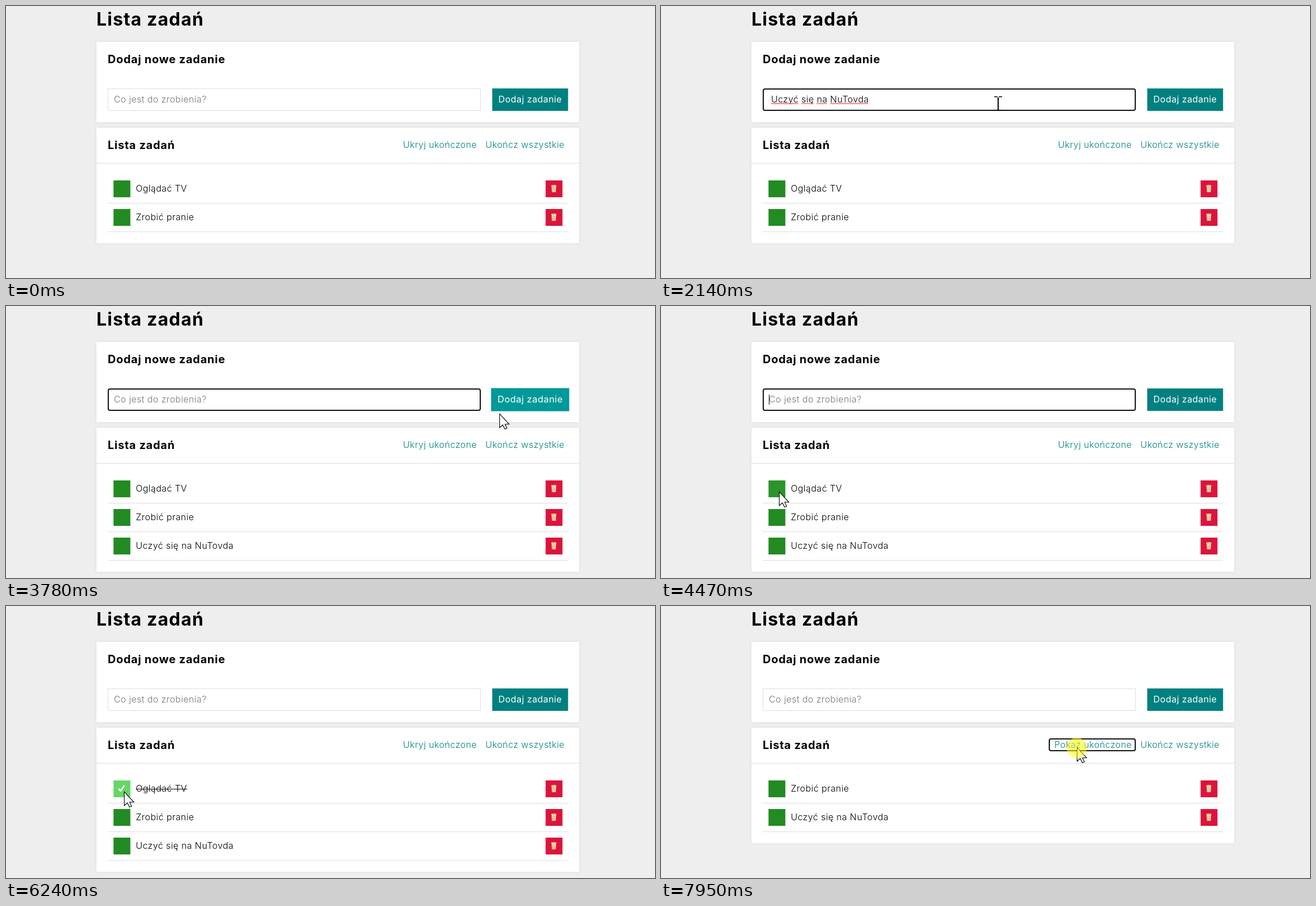
These frames come from a looping animation (1155 px wide and 485 px high, 8000 ms). An HTML page with a canvas:

```html
<!DOCTYPE html>
<html lang="pl">
<head>
<meta charset="utf-8">
<title>Lista zadań</title>
<style>
  html, body { margin: 0; width: 100%; height: 100%; overflow: hidden; background: #eee; }
  canvas { display: block; }
</style>
</head>
<body>
<canvas id="stage" width="1155" height="485"></canvas>
<script>
const ctx = document.getElementById('stage').getContext('2d');
const LOOP = 8000, TICK = 77.2, PHASE = 0.32, BLINK = 530;
const TEAL = '#008080', LINE = '#ddd';
const TASKS = ['Oglądać TV', 'Zrobić pranie', 'Uczyć się na NuTovda'];
const ROW = 51, NUDGE = 0.33; // animated boxes sit slightly off the pixel grid

// Mouse button down and up
const CLICK = {
  input: { down: 750, up: 840 },
  add: { down: 3150, up: 3230 },
  check: { down: 5390, up: 5470 },
  hide: { down: 7180, up: 7340 },
  show: { down: 7950, up: LOOP }
};
const APPEAR = 130, PASTE = 1150, SPELLCHECK = 1220;

// Each move bends towards `via` and slows down by the power `slow`
const HOME = [821, 390];
const MOVES = [
  { start: 130, end: 587, via: [365, 250], to: [337, 167], slow: 1.5 },
  { start: 1840, end: 2680, via: [652, 179], to: [968, 173], slow: 1.24 },
  { start: 2750, end: 2980, via: [965, 168], to: [961, 164], slow: 1 },
  { start: 3700, end: 4450, via: [600, 290], to: [210, 331], slow: 1.5 },
  { start: 6320, end: 7150, via: [670, 305], to: [740, 252], slow: 1.82 }
];

const pressed = (t, click) => t >= click.down && t < click.up;
const clamp = v => Math.max(0, Math.min(1, v));
const easeOut = (p, power) => 1 - Math.pow(1 - clamp(p), power);
const fade = (t, start, end, length) =>
  easeOut((t - start) / length, 2.3) * (1 - easeOut((t - end) / length, 2.3));
const mix = (a, b, p) => `rgb(${a.map((v, i) => Math.round(v + (b[i] - v) * p))})`;

function pointerAt(t) {
  let pos = HOME;
  for (const { start, end, via, to, slow } of MOVES) {
    if (t < start) break;
    const s = easeOut((t - start) / (end - start), slow), r = 1 - s;
    pos = pos.map((v, i) => r * r * v + 2 * r * s * via[i] + s * s * to[i]);
  }
  return pos.map(Math.round);
}

function rect(x, y, w, h, fill) {
  ctx.fillStyle = fill;
  ctx.fillRect(x, y, w, h);
}

function ring(x, y, w, h, r = 3) {
  ctx.strokeStyle = '#101010';
  ctx.lineWidth = 2;
  ctx.beginPath();
  ctx.roundRect(x, y, w, h, r);
  ctx.stroke();
}

function setFont(size, weight) {
  ctx.font = `${weight} ${size}px Inter, sans-serif`;
  ctx.letterSpacing = (weight > 600 ? size * 0.037 : 0.42) + 'px';
}

function text(str, x, y, { color = '#000', size = 16, weight = 300, align = 'left' } = {}) {
  setFont(size, weight);
  ctx.textAlign = align;
  ctx.fillStyle = color;
  ctx.fillText(str, x, y);
  return ctx.measureText(str).width;
}

const heading = (str, x, y, size = 20) => text(str, x, y, { size, weight: 700 });
const link = (str, right) => text(str, right, 253, { color: TEAL, align: 'right' });

function panel(y, h) {
  ctx.save();
  ctx.shadowColor = '#ddd';
  ctx.shadowBlur = 5;
  rect(161, y, 859, h, '#fff');
  ctx.restore();
}

function squiggle(str, x, y) {
  setFont(16, 300);
  ctx.strokeStyle = '#f00';
  ctx.lineWidth = 1;
  let done = '';
  for (const word of str.split(' ')) {
    const from = x + ctx.measureText(done).width;
    const to = from + ctx.measureText(word).width;
    ctx.beginPath();
    for (let px = from, k = 0; px <= to; px += 2, k++) ctx.lineTo(px, y + (k % 2 ? -1 : 1));
    ctx.stroke();
    done += word + ' ';
  }
}

function drawInput(t) {
  const typed = t >= PASTE && t < CLICK.add.up;
  const focused = t >= CLICK.input.down && t < CLICK.check.down && !pressed(t, CLICK.add);
  if (focused) {
    ring(182, 148, 662, 38);
  } else {
    ctx.strokeStyle = LINE;
    ctx.lineWidth = 1;
    ctx.strokeRect(181.5, 147.5, 663, 39);
  }
  let caretX = 192;
  if (typed) {
    caretX = Math.round(196 + text(TASKS[2], 196, 172));
    if (t >= SPELLCHECK) squiggle(TASKS[2], 196, 174);
  } else {
    text('Co jest do zrobienia?', 192, 172, { color: '#757575' });
  }
  // Every edit restarts the blinking
  const edit = [CLICK.add.up, PASTE, CLICK.input.down].find(start => t >= start);
  if (focused && Math.floor((t - edit) / BLINK) % 2 === 0) rect(caretX, 158, 1, 18, '#000');
}

function drawButton(t, tick) {
  const hover = fade(tick, 2480, 3760, 500);
  ctx.save();
  ctx.translate(932.5 + NUDGE, 167);
  const scale = 1 + 0.03 * hover;
  ctx.scale(scale, scale);
  rect(-67.5, -20, 135, 40, mix([0, 128, 128], [0, 153, 153], hover));
  text('Dodaj zadanie', 0, 5, { color: '#fff', weight: 400, align: 'center' });
  if (pressed(t, CLICK.add)) ring(-67.5, -20, 135, 40);
  ctx.restore();
}

function drawBin(x, y) {
  rect(x + NUDGE, y, 30, 30, '#dc143c');
  ctx.fillStyle = '#f4e3b5';
  ctx.beginPath();
  ctx.ellipse(x + 15, y + 9.7, 4.7, 1.8, 0, 0, Math.PI * 2);
  ctx.fill();
  ctx.beginPath();
  ctx.moveTo(x + 11, y + 11);
  ctx.lineTo(x + 19, y + 11);
  ctx.lineTo(x + 18.3, y + 21);
  ctx.lineTo(x + 11.7, y + 21);
  ctx.fill();
  ctx.strokeStyle = '#a8743f';
  ctx.lineWidth = 0.7;
  ctx.beginPath();
  ctx.moveTo(x + 12, y + 9.7);
  ctx.lineTo(x + 18, y + 9.7);
  for (const dx of [13.5, 16.5]) {
    ctx.moveTo(x + dx, y + 12);
    ctx.lineTo(x + dx, y + 20.5);
  }
  ctx.stroke();
}

function drawCheck(x, y) {
  ctx.save();
  ctx.strokeStyle = '#fff';
  ctx.lineWidth = 2.6;
  ctx.lineJoin = ctx.lineCap = 'round';
  ctx.beginPath();
  ctx.moveTo(x + 10.2, y + 15.5);
  ctx.lineTo(x + 13, y + 19);
  ctx.lineTo(x + 19, y + 9.5);
  ctx.stroke();
  ctx.restore();
}

function drawTask(name, y, { hover = 0, done = false, focused = false }) {
  rect(191 + NUDGE, y, 30, 30, mix([34, 139, 34], [107, 219, 107], hover));
  if (done) drawCheck(191, y);
  if (focused) ring(191, y, 30, 30, 2);
  const width = text(name, 231, y + 20);
  if (done) rect(231, y + 15, width, 1, '#000');
  drawBin(960, y);
  rect(181, y + 40, 819, 1, LINE);
}

function drawList(t, tick) {
  const hidden = t >= CLICK.hide.up;
  const tasks = TASKS.slice(hidden ? 1 : 0, t < CLICK.add.up ? 2 : 3);
  const done = t >= CLICK.check.up;
  const watched = {
    done,
    hover: done ? fade(tick, 5540, 6390, 1000) : fade(tick, 4400, LOOP, 1000),
    focused: pressed(t, CLICK.check)
  };

  panel(217, 104 + ROW * tasks.length);
  rect(161, 280, 859, 1, LINE);
  heading('Lista zadań', 181, 255);
  link(hidden ? 'Pokaż ukończone' : 'Ukryj ukończone', 838);
  link('Ukończ wszystkie', 994);
  if (pressed(t, CLICK.hide)) ring(698, 237, 146, 21);
  if (pressed(t, CLICK.show)) ring(691, 237, 153, 21);
  tasks.forEach((name, i) => drawTask(name, 311 + ROW * i, name === TASKS[0] ? watched : {}));
}

function drawBeam(x, y) {
  rect(x - 1, y - 11, 2, 23, '#000');
  for (const dy of [-13, 11]) {
    rect(x - 7, y + dy, 6, 1.5, '#000');
    rect(x + 1, y + dy, 6, 1.5, '#000');
  }
}

function drawArrow(x, y) {
  const shape = [[0, 0], [0, 24.5], [5.5, 19.5], [9.3, 27], [13, 25.5], [9.6, 18.3], [17, 18.3]];
  ctx.beginPath();
  for (const [dx, dy] of shape) ctx.lineTo(x + 0.5 + dx, y + 0.5 + dy);
  ctx.closePath();
  ctx.fillStyle = '#fff';
  ctx.fill();
  ctx.strokeStyle = '#000';
  ctx.lineWidth = 1.1;
  ctx.stroke();
}

function drawPointer(t, tick) {
  if (t < APPEAR) return;
  const [x, y] = pointerAt(tick);
  const overInput = x > 181 && x < 845 && y > 147 && y < 187;
  (overInput ? drawBeam : drawArrow)(x, y);
  if (Object.values(CLICK).some(click => pressed(t, click))) {
    ctx.fillStyle = 'rgba(255, 255, 0, 0.52)';
    ctx.beginPath();
    ctx.arc(x, y + 1, 18, 0, Math.PI * 2);
    ctx.fill();
  }
}

function draw(t) {
  // The screen refreshes in even ticks
  const tick = (Math.floor(t / TICK + PHASE) - PHASE) * TICK;
  rect(0, 0, 1155, 485, '#eee');
  heading('Lista zadań', 161, 35, 32);
  panel(64, 143);
  heading('Dodaj nowe zadanie', 181, 102);
  drawInput(t);
  drawButton(t, tick);
  drawList(t, tick);
  drawPointer(t, tick);
}

const start = performance.now();
function loop() {
  draw((performance.now() - start) % LOOP);
  requestAnimationFrame(loop);
}
loop();
</script>
</body>
</html>
```
